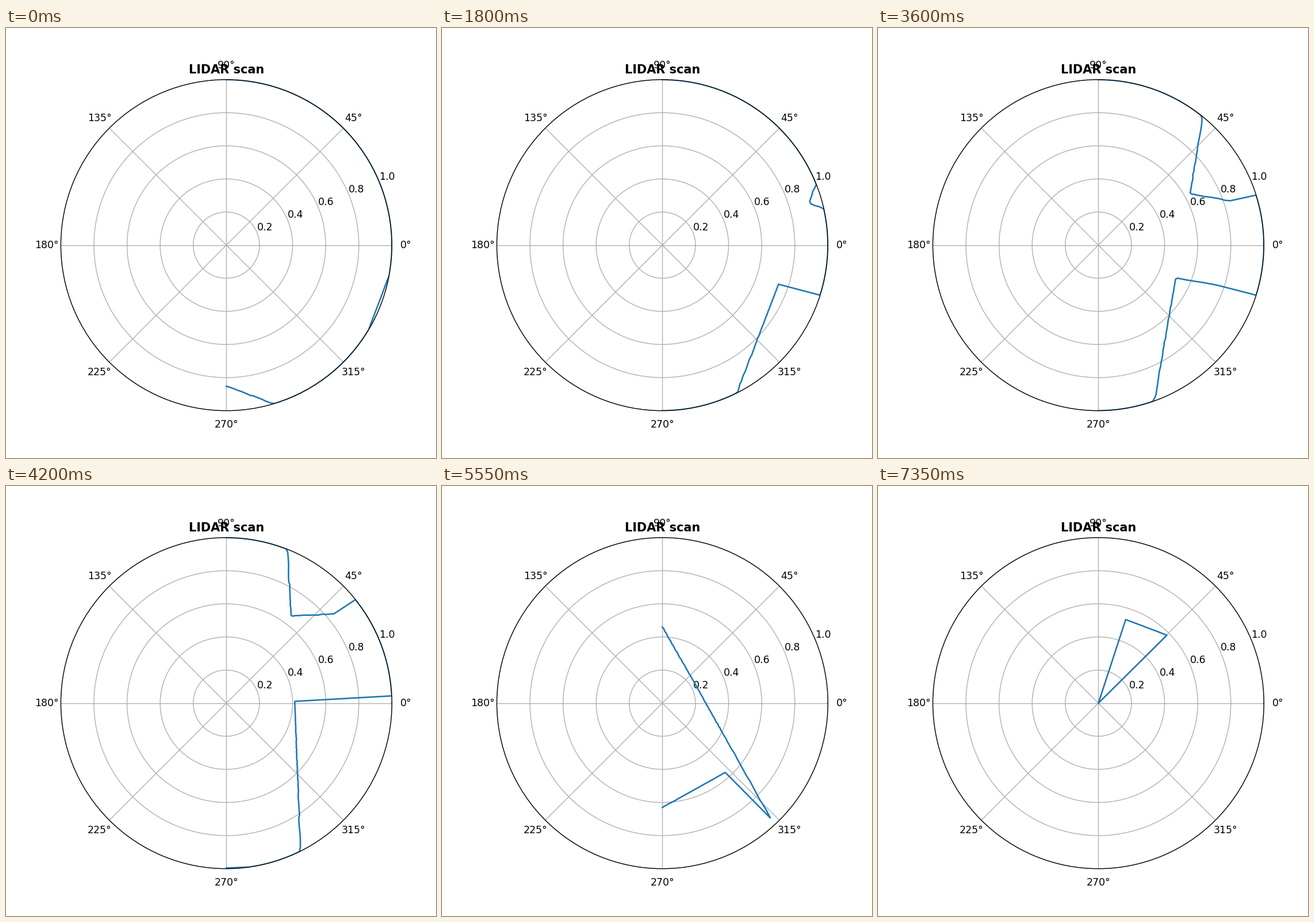
A matplotlib script for the animation above (7500 ms loop, 748 by 748 pixels).

```python
import math

import numpy as np
import matplotlib.pyplot as plt
from matplotlib.animation import FuncAnimation

SIZE, DPI = 748, 125
FRAMES, INTERVAL = 50, 150

# World in pixels, y pointing down. The sensor stays at SENSOR_X.
SENSOR_X, START_Y = 91, 248
MAX_RANGE, BEAMS = 196, 180
PIPE_X, PIPE_W, PIPE_H, PIPE_SPEED = 284, 52, 320, 4
GAP_TOP, GAP = 110, 100
GROUND = (-100, 404, 500, 112)

FLAPS = {12, 38, 44, 49}
FLAP_VEL, MAX_VEL = -9, 10
FLAP_ROT, ROT_STEP, MAX_TILT = 45, 3, 20


def fly():
    """Height and tilt of the sensor for every frame."""
    y, vel, rot = START_Y, -8, FLAP_ROT - ROT_STEP
    path = [(y, MAX_TILT)]
    for t in range(1, FRAMES):
        if t in FLAPS:
            vel, rot = FLAP_VEL, FLAP_ROT
        else:
            vel = min(vel + 1, MAX_VEL)
            rot -= ROT_STEP
        y += vel
        path.append((y, min(rot, MAX_TILT)))
    return path


def first_hit(rect, x1, y1, x2, y2):
    """Integer Cohen-Sutherland clip; entry point of the line or None."""
    left, top, w, h = rect
    right, bottom = left + w - 1, top + h - 1

    def outcode(x, y):
        return ((y < top) | (y > bottom) << 1
                | (x < left) << 2 | (x > right) << 3)

    c1, c2 = outcode(x1, y1), outcode(x2, y2)
    while c1 or c2:
        if c1 & c2:
            return None
        code = c1 or c2
        px, py = (x1, y1) if c1 else (x2, y2)
        if code & 3:
            y = top if code & 1 else bottom
            x = px + int((x2 - x1) * (y - py) / (y2 - y1))
        else:
            x = left if code & 4 else right
            y = py + int((y2 - y1) * (x - px) / (x2 - x1))
        if c1:
            x1, y1, c1 = x, y, outcode(x, y)
        else:
            x2, y2, c2 = x, y, outcode(x, y)
    return x1, y1


def scan(t):
    """Normalised ranges, from the topmost beam to the lowest."""
    y, tilt = PATH[t]
    pipe_x = PIPE_X - PIPE_SPEED * t
    upper = (pipe_x, GAP_TOP - PIPE_H, PIPE_W, PIPE_H)
    lower = (pipe_x, GAP_TOP + GAP, PIPE_W, PIPE_H)
    ranges = np.ones(BEAMS)
    for i in range(BEAMS):
        a = math.radians(i - 90 - tilt)
        end = (int(SENSOR_X + MAX_RANGE * math.cos(a)),
               int(y + MAX_RANGE * math.sin(a)))
        # Pipes take precedence over the ground.
        for rect in (upper, lower, GROUND):
            hit = first_hit(rect, SENSOR_X, y, *end)
            if hit:
                dist = math.hypot(hit[0] - SENSOR_X, hit[1] - y)
                ranges[i] = dist / MAX_RANGE
                break
    return ranges


PATH = fly()
theta = np.linspace(math.pi / 2, -math.pi / 2, BEAMS)

fig = plt.figure(figsize=(SIZE / DPI, SIZE / DPI), dpi=DPI)
ax = fig.add_subplot(projection="polar")
ax.set_ylim(0, 1)
ax.set_yticks([0.2, 0.4, 0.6, 0.8, 1.0])
ax.set_title("LIDAR scan", fontweight="bold", y=1.0)
line, = ax.plot(theta, scan(0))


def update(t):
    line.set_ydata(scan(t))
    return line,


anim = FuncAnimation(fig, update, frames=FRAMES, interval=INTERVAL,
                     repeat=True, repeat_delay=0)
plt.show()
```
